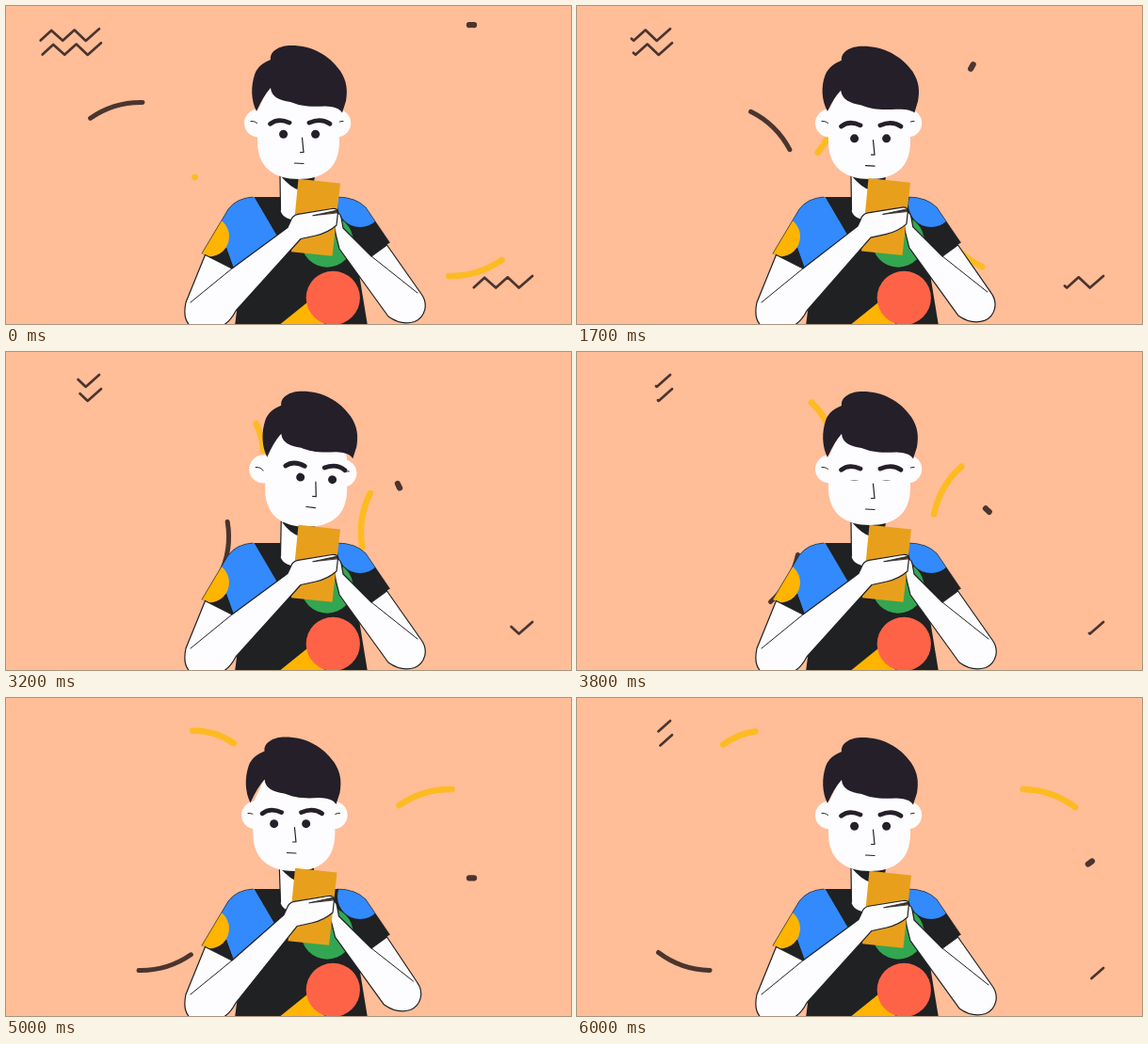
An HTML page with a canvas for the animation above (6100 ms loop, 600x338 px).

```html
<!DOCTYPE html>
<html lang="en">
<head>
<meta charset="utf-8">
<style>
html, body { margin: 0; width: 600px; height: 338px; overflow: hidden; background: #ffbd98 }
canvas { display: block }
</style>
</head>
<body>
<canvas id="stage" width="600" height="338"></canvas>
<script>
const g = document.getElementById('stage').getContext('2d');
const PEACH = '#ffbd98', BROWN = '#4a352f', YELLOW = '#fdbb22', WHITE = '#fdfcfe',
  INK = '#1f2123', HAIR = '#241f29', BLUE = '#328afc', GREEN = '#33a651',
  RED = '#ff6347', AMBER = '#ffb400', PHONE = '#e8a01c';
const RAD = Math.PI / 180;

function shape(d, fill, line, width = 1.2) {
  const path = new Path2D(d);
  if (fill) { g.fillStyle = fill; g.fill(path); }
  if (line) { g.strokeStyle = line; g.lineWidth = width; g.stroke(path); }
}

function disc(x, y, rx, fill, ry = rx) {
  g.fillStyle = fill;
  g.beginPath();
  g.ellipse(x, y, rx, ry, 0, 0, 7);
  g.fill();
}

// Angles in degrees, clockwise from the top
function arc(x, y, r, from, to, color, width) {
  g.strokeStyle = color;
  g.lineWidth = width;
  g.beginPath();
  g.arc(x, y, r, (from - 90) * RAD, (to - 90) * RAD);
  g.stroke();
}

function shifted(x, y, draw, turn = 0, cx = 311.5, cy = 145) {
  g.save();
  g.translate(x + cx, y + cy);
  g.rotate(turn * RAD);
  g.translate(-cx, -cy);
  draw();
  g.restore();
}

// Smooth interpolation between [time, value] keys
function track(t, keys) {
  if (t <= keys[0][0]) return keys[0][1];
  for (let i = 1; i < keys.length; i++) {
    const [t0, a] = keys[i - 1], [t1, b] = keys[i];
    if (t < t1) {
      const u = (t - t0) / (t1 - t0);
      return a + (b - a) * u * u * (3 - 2 * u);
    }
  }
  return keys[keys.length - 1][1];
}

const turnKeys = [[1.95, 0], [2.4, 19], [3.1, 19], [3.65, 0], [4.05, 0], [4.5, -7], [5.05, -10], [5.6, -8], [6, 0]];
const liftKeys = [[1.95, 0], [2.4, -2], [3.1, -2], [3.65, 0], [4.05, 0], [4.5, -1], [5.6, -4.5], [6, 0]];
const blinkKeys = [[3.6, 1], [3.75, .06], [3.85, .06], [4, 1]];

function zigzag(x, y, trim) {
  g.setLineDash([84 * trim, 200]);
  shape(`M${x + 62},${y} l-14.3,12.6 l-12,-11.3 l-12.5,11.2 l-12,-10.8 l-11.8,10.8`, null, BROWN, 2.7);
  g.setLineDash([]);
}

function backdrop(t) {
  const spin = 36 * t, grown = (t < 5 ? t : 10 - t) / 5;
  if (grown < 1) {
    zigzag(37, 24.3, 1 - grown);
    zigzag(39, 39.3, 1 - grown);
    zigzag(497, 287, 1 - grown);
  }
  arc(143, 196, 93.5, spin - 34.8, spin + 1.2, BROWN, 5);
  arc(494.5, 105.7, 85.7, -spin - 1.7, -spin + 1.7, BROWN, 6.2);
  arc(472, 192, 95, spin + 145, spin + 181, YELLOW, 6.5);
  arc(199.5, 108.3, 73.6, 179 - spin, 179.2 - spin + 36 * grown, YELLOW, 6.5);
}

function shirt() {
  const outline = 'M291,203 L262,203 Q245,204 236,216 L208,263 L241,279 L252,270 L243,340 L384,340 L375,285 L388,266 L407.5,251.5 L382,214 Q371,203 352,203 Z';
  shape(outline, INK);
  g.save();
  g.clip(new Path2D(outline));
  shape('M263,202 L290,248 L262,274 L242,279 L234,257 L205,265 L205,202 Z', BLUE);
  shape('M205,266 L234,257 L242,280 Z', INK);
  disc(215.5, 245, 21.5, AMBER);
  disc(376, 211, 24, BLUE);
  disc(341, 250, 27.7, GREEN);
  shape('M289,340 L320,315 L340,340 Z', AMBER);
  disc(347.3, 310.3, 28.6, RED);
  g.restore();
  shape('M262,203 Q245,204 236,216 L208,263 M352,203 Q371,203 382,214 L407.5,251.5', null, INK, .6);
}

function neck(x) {
  shape(`M${291 + x},178 L291.5,217 Q293,226 308,228 L328,205 L${328 + x},178 Z`, WHITE);
  shape(`M${292 + x},181 L${328 + x},181 L326,196 L312,196 Q302,193 ${292 + x},181 Z`, INK);
  shape(`M${291 + x},180 L291.5,217`, null, INK);
}

function head(look, lift, down, open) {
  const tilt = Math.max(0, look) * .25;
  shifted(look * .3, 0, () => {
    disc(268, 124.5, 15, WHITE);
    shape('M260,122.5 Q265,122 268,126', null, INK, 1);
  });
  shifted(look * .36, tilt, () => {
    disc(351.5, 124.5, 14.7, WHITE);
    shape('M350,126.5 Q353,122 358,122.5', null, INK, 1);
  });
  shifted(look * .47, tilt * .4, () =>
    shape('M267,112 L279,86 L350,86 L354,112 L354,144 C354,172 337,184 311,184 C285,184 267,172 267,144 Z', WHITE));
  const d = down;
  shifted(look * .65, lift * .15, () =>
    shape(`M266,112 C${260 - 2 * d},100 ${260 - 3 * d},85 ${264 - 2 * d},${73 + 3 * d}
      C267,${64 + 3 * d} 274,${60 + 3 * d} 281,${57 + 3 * d}
      C280,${48 + 3 * d} 290,${42 + 2.5 * d} 303,${42 + 2.5 * d}
      C${325 + 3 * d},${42 + 2.5 * d} ${343 + 4 * d},${52 + 2 * d} ${355 + 5 * d},${69 + 2 * d}
      C${362 + 5 * d},${80 + 3 * d} ${363 + 4 * d},${89 + 3 * d} ${361 + 4 * d},101
      L${357 + 5 * d},113.5 C354,${108 + 7 * d} 347,${107 + 11 * d} 339,${106.5 + 12 * d}
      C320,${107.5 + 12 * d} 312,${106 + 12 * d} 302,${102 + 13 * d}
      C${290 - d},${100 + 11 * d} ${282 - 2 * d},${97 + 10 * d} ${281 - 3 * d},${87 + 10 * d}
      Q${273 - d},${96 + 5 * d} 266,112 Z`, HAIR));
  shifted(look, lift, () => {
    const brow = 10 * d, eye = 136.2 + 17 * d, low = 9.5 * d, slip = -.19 * look;
    shifted(slip * .8, 0, () =>
      shape(`M280.5,${125.3 + brow} Q289,${118.5 + brow} 301,${124.1 + brow}
        M322,${124.1 + brow} Q334.5,${118.5 + brow} 344,${125.3 + brow}`, null, HAIR, 4.8));
    disc(294.6, eye, 4.5, HAIR, 4.5 * open);
    disc(328.6, eye, 4.5, HAIR, 4.5 * open);
    shape(`M${314.5 + slip},${140 + low} L${316 + slip},${155.5 + low} L${312.5 + slip},${155.5 + low}
      M${306.5 + slip},${167 + low} L${316 + slip},${167.5 + low}`, null, HAIR, 1.2);
  }, tilt);
}

function rightArm(x, y) {
  const at = (px, py) => `${px + x},${py + y}`;
  shape(`M${at(348, 224)} Q${at(354, 217)} ${at(356, 225)} L${at(358, 236)} L388,266 L404.5,254
    L${at(441, 306)} C${at(449, 317)} ${at(445, 331)} ${at(434, 335.5)}
    Q${at(420, 340)} ${at(406, 330)} L${at(354, 258)} L${at(350, 242)} Z`, WHITE, INK);
  shape(`M388,266 L${at(437, 305)}`, null, INK, 1);
}

function phone(x, y) {
  shifted(x, y, () => shape('M310.5,183.7 L355,188.5 L346.5,265.7 L303,261.3 Z', PHONE));
}

function leftArm(x, y) {
  const at = (px, py) => `${px + x},${py + y}`;
  shape(`M211.5,264.5 L191,315 Q187,334 197,341 L228,341 Q238,336 244,324
    L${at(313, 247.5)} L${at(329, 244)} Q${at(342, 241)} ${at(351, 233)} L${at(352.5, 219)} Q${at(352, 214.5)} ${at(346, 215.5)}
    L${at(310, 221.3)} Q${at(304, 222.5)} ${at(302.5, 228)} L${at(299, 235.5)} L240,279 Z`, WHITE, INK);
  shape('M240,279 L196,315', null, INK, 1);
  shape(`M${at(326, 222.7)} L${at(352, 217)} L${at(352, 219.5)} Z`, '#4a3215', INK, .8);
}

function draw(t) {
  g.fillStyle = PEACH;
  g.fillRect(0, 0, 600, 338);
  g.lineCap = g.lineJoin = 'round';
  const wave = t < .05 ? 0 : (1 - Math.cos(Math.PI * (t - .05))) / 2;
  const raise = t < 2.05 || t > 4.05 ? wave : 0;
  const down = t < 2.05 ? wave : 0;
  const look = track(t, turnKeys);
  backdrop(t);
  shirt();
  neck(look * .07);
  head(look, track(t, liftKeys), down, track(t, blinkKeys));
  rightArm(-4.5 * raise, -4 * raise);
  phone(-3.5 * raise, -3 * raise);
  leftArm(-4 * raise, -5 * raise);
}

// The motion advances ten times a second
function tick() {
  draw(Math.floor(performance.now() / 100) % 61 / 10);
  requestAnimationFrame(tick);
}
tick();
</script>
</body>
</html>
```
